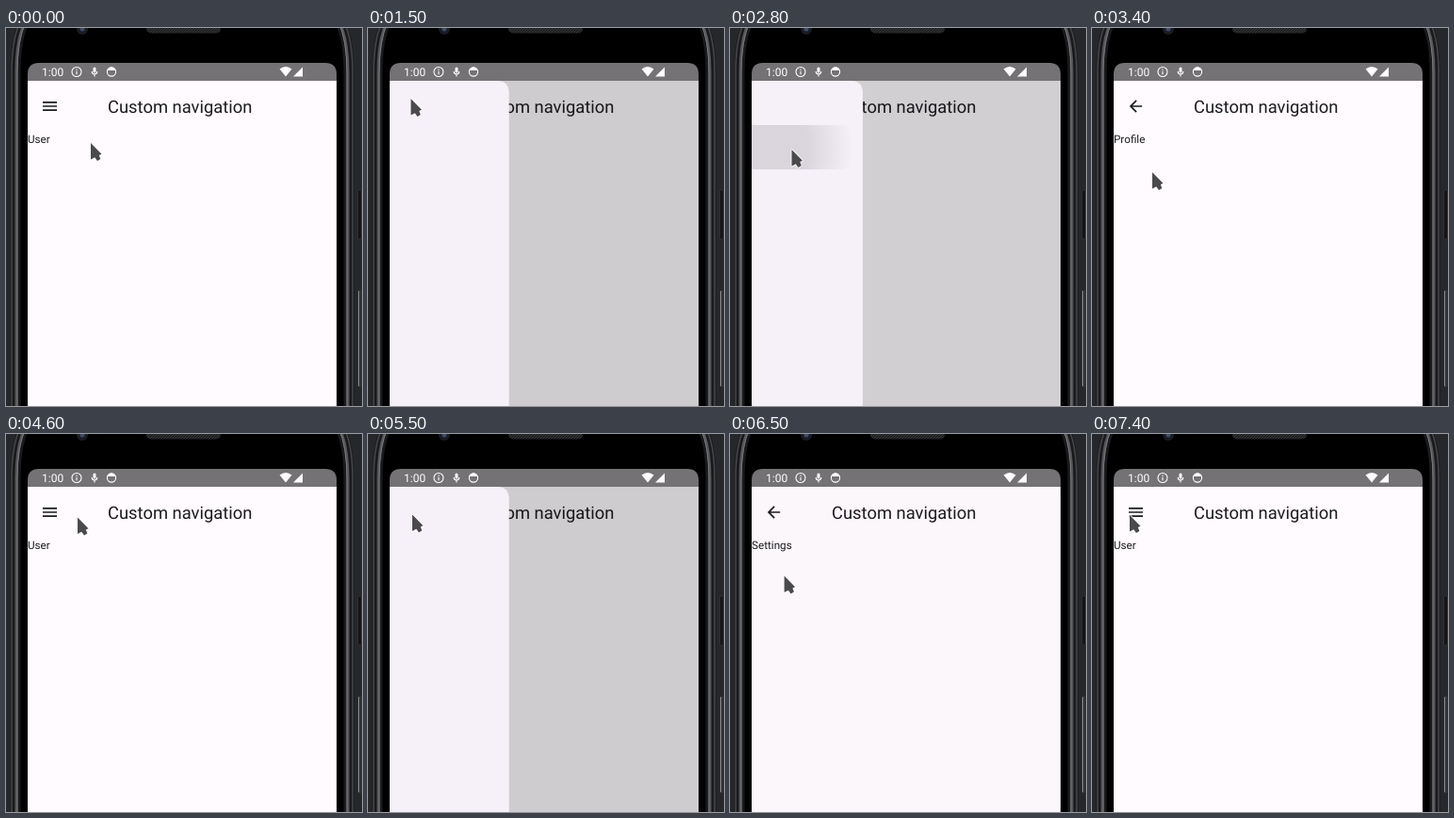
Animation of 378 by 401 pixels, one loop 8 s. Source, as an HTML page:

```html
<!DOCTYPE html>
<html lang="en">
<head>
<meta charset="utf-8">
<title>Custom navigation</title>
<style>
  html, body { margin: 0; width: 100%; height: 100%; overflow: hidden; background: #26272a; }
  svg { display: block; }
  text { font: 11.7px Roboto, sans-serif; text-rendering: geometricPrecision; fill: #1c1b1f; }
  .title { font-size: 18.4px; text-anchor: middle; }
  .clock { font-size: 12px; fill: #fff; }
  .drawer text { fill: #49454f; }
  .line { fill: none; stroke: #fff; }
</style>
</head>
<body>
<svg width="378" height="401" viewBox="0 0 378 401">
  <defs>
    <radialGradient id="wave">
      <stop offset=".6" stop-color="#1c1b1f" stop-opacity=".13"/>
      <stop offset="1" stop-color="#1c1b1f" stop-opacity="0"/>
    </radialGradient>
    <pattern id="mesh" width="3" height="3" patternUnits="userSpaceOnUse">
      <rect width="3" height="3" fill="#303032"/>
      <path d="M0 3L3 0" stroke="#151516"/>
    </pattern>
    <clipPath id="pill"><rect id="pillRect" width="251" height="47" rx="23.5"/></clipPath>
    <path id="edge" d="M19 -6Q10 12 10 48V410"/>
  </defs>

  <!-- phone -->
  <rect width="378" height="401" fill="#26272a"/>
  <path d="M19 -6Q10 12 10 48V410H364V48Q364 12 355 -6Z"/>
  <g id="rim" fill="none">
    <use href="#edge" stroke="#1a1a1c" stroke-width="11"/>
    <use href="#edge" x="-4" stroke="#47484b" stroke-width="1.5"/>
    <use href="#edge" x="1" stroke="#55575a" stroke-width="3"/>
    <use href="#edge" x="2" stroke="#77797c" stroke-width="1"/>
  </g>
  <use href="#rim" transform="matrix(-1 0 0 1 374 0)"/>
  <rect x="373.500" y="172" width="4" height="52" rx="1" fill="#151517" stroke="#3b3c3f" stroke-width=".7"/>
  <rect x="373.500" y="278" width="4" height="103" rx="1" fill="#333437"/>
  <path d="M374.500 279V380" stroke="#8a8b8e"/>
  <rect x="149" y="-6" width="79" height="11.500" rx="5" fill="url(#mesh)"/>
  <circle cx="81" cy="1" r="6" fill="#1b1c20"/>
  <circle cx="81" cy="1" r="2.500" fill="#3f4c66"/>

  <!-- status bar -->
  <path d="M23 56V49Q23 37 35 37H339Q351 37 351 49V56Z" fill="#747274"/>
  <text class="clock" x="38" y="51">1:00</text>
  <g class="line" stroke-width="1.1">
    <circle cx="75" cy="46.500" r="5"/>
    <path d="M75 45.800V49.300M75 43.400V44.700"/>
    <path d="M91.200 46Q91.200 49 94 49T96.800 46M94 49V51.500"/>
    <circle cx="112" cy="46.500" r="4.600"/>
  </g>
  <g fill="#fff">
    <rect x="92.500" y="41.500" width="3" height="6" rx="1.500"/>
    <path d="M107.600 45Q108.500 41.500 112 41.500T116.400 45Z"/>
    <path d="M290.500 43.500Q297 38.500 303.500 43.500L297 51.500Z"/>
    <path d="M305 51.500L315 41.500V51.500Z"/>
  </g>

  <!-- app screen -->
  <svg x="23" y="56" width="328" height="345">
    <rect width="328" height="345" fill="#fffbff"/>
    <circle id="press" cx="23.500" cy="27" r="17" fill="url(#wave)"/>
    <g id="home">
      <path transform="translate(13.500 17) scale(.835)" fill="#1c1b1f" d="M3 18h18v-2H3v2zm0-5h18v-2H3v2zm0-7v2h18V6H3z"/>
      <text x="0" y="66">User</text>
    </g>
    <g id="sub">
      <path transform="translate(13.500 17) scale(.835)" fill="#1c1b1f" d="M20 11H7.830l5.590-5.590L12 4l-8 8 8 8 1.410-1.410L7.830 13H20v-2z"/>
      <text id="subName" x="0" y="66"></text>
    </g>
    <text class="title" x="161.700" y="34">Custom navigation</text>
    <rect id="scrim" width="328" height="345"/>
    <g id="drawer" class="drawer">
      <path d="M0 0H238Q251 0 251 13V345H0Z" fill="#f6f1f8"/>
      <g clip-path="url(#pill)"><circle id="ripple" fill="url(#wave)"/></g>
      <text x="13.200" y="28">User</text>
      <text x="13.200" y="75">Profile</text>
      <text x="13.200" y="122">Settings</text>
    </g>
  </svg>

  <g id="cursor">
    <path d="M0 0L11.500 11.800L8.800 13L10.300 17L7 19L4.300 15.300L0 17.500Z"
      fill="#4a494b" stroke="#fff" stroke-opacity=".75" stroke-width="2" stroke-linejoin="round" paint-order="stroke"/>
  </g>
</svg>
<script>
const LOOP = 8000, TICK = 100;
const OPEN_MS = 256, TRAVEL = 300, ITEM = 47;

// Each visit: drawer opens, an item is pressed, the back arrow returns home
const visits = [
  { name: 'Profile', row: 1, open: 1401, press: 2610, back: 3850 },
  { name: 'Settings', row: 2, open: 5401, press: 6210, back: 7250 }
];
const CLOSE_DELAY = 106;

// Pointer stops: time, x, y
const stops = [
  [100, 90, 122], [200, 102, 130], [400, 135, 145], [500, 124, 136], [700, 82, 101],
  [800, 82, 101], [1000, 45.500, 75], [1700, 45.500, 75], [1900, 57.500, 92],
  [2100, 65, 138], [2300, 65, 138], [2400, 65.500, 129], [3200, 65.500, 129],
  [3400, 64, 153], [3700, 42, 85.500], [4500, 42, 85.500], [4600, 76, 88.500],
  [4700, 106, 85.500], [4800, 106, 85.500], [5100, 47, 85.500], [5600, 47, 85.500],
  [5900, 63.500, 172], [6400, 63.500, 172], [6800, 40, 86]
];

const el = id => document.getElementById(id);
const [press, home, sub, subName, scrim, drawer, ripple, pillRect, cursor] =
  ['press', 'home', 'sub', 'subName', 'scrim', 'drawer', 'ripple', 'pillRect', 'cursor'].map(el);
const clamp = v => Math.min(1, Math.max(0, v));
const mix = (a, b, p) => a + (b - a) * p;
const set = (node, attrs) => {
  for (const key in attrs) node.setAttribute(key, attrs[key]);
};

// cubic-bezier(.4, 0, .2, 1), solved by bisection
function ease(x) {
  let lo = 0, hi = 1;
  for (let i = 0; i < 24; i++) {
    const s = (lo + hi) / 2, r = 1 - s;
    if (1.2 * r * r * s + .6 * r * s * s + s ** 3 < x) lo = s; else hi = s;
  }
  return lo * lo * (3 - 2 * lo);
}
const ramp = (t, start) => ease(clamp((t - start) / OPEN_MS));

function pointerAt(t) {
  const i = stops.findIndex(s => s[0] > t);
  if (i < 0) return stops[stops.length - 1].slice(1);
  if (i === 0) return stops[0].slice(1);
  const a = stops[i - 1], b = stops[i], p = (t - a[0]) / (b[0] - a[0]);
  return [mix(a[1], b[1], p), mix(a[2], b[2], p)];
}

function drawRipple(age, row) {
  const q = clamp(age / 200) ** 1.7;
  set(pillRect, { y: row * ITEM });
  set(ripple, {
    cx: mix(41, 125, q),
    cy: (row + .5) * ITEM,
    r: mix(18, 133, q),
    opacity: age < 0 ? 0 : clamp((375 - age) / 150)
  });
}

function draw(t) {
  const v = t < 4500 ? visits[0] : visits[1];
  const shown = ramp(t, v.open) - ramp(t, v.press + CLOSE_DELAY);
  set(drawer, { transform: `translate(${(shown - 1) * TRAVEL} 0)` });
  set(scrim, { opacity: .32 * shown });
  drawRipple(t - v.press, v.row);

  const away = t < v.press + CLOSE_DELAY ? 0 : clamp((v.back + 100 - t) / 100);
  subName.textContent = v.name;
  set(sub, { opacity: away });
  set(home, { opacity: 1 - away });

  const pressed = (t >= 1400 && t < 1500) || (t >= 5400 && t < 5500) || (t >= 7200 && t < 7400);
  set(press, { opacity: pressed ? .7 : 0 });
  set(cursor, { transform: `translate(${pointerAt(t)})` });
}

const begin = performance.now();
function tick() {
  const t = (performance.now() - begin) % LOOP;
  draw(Math.floor(t / TICK) * TICK);
  requestAnimationFrame(tick);
}
tick();
</script>
</body>
</html>
```
